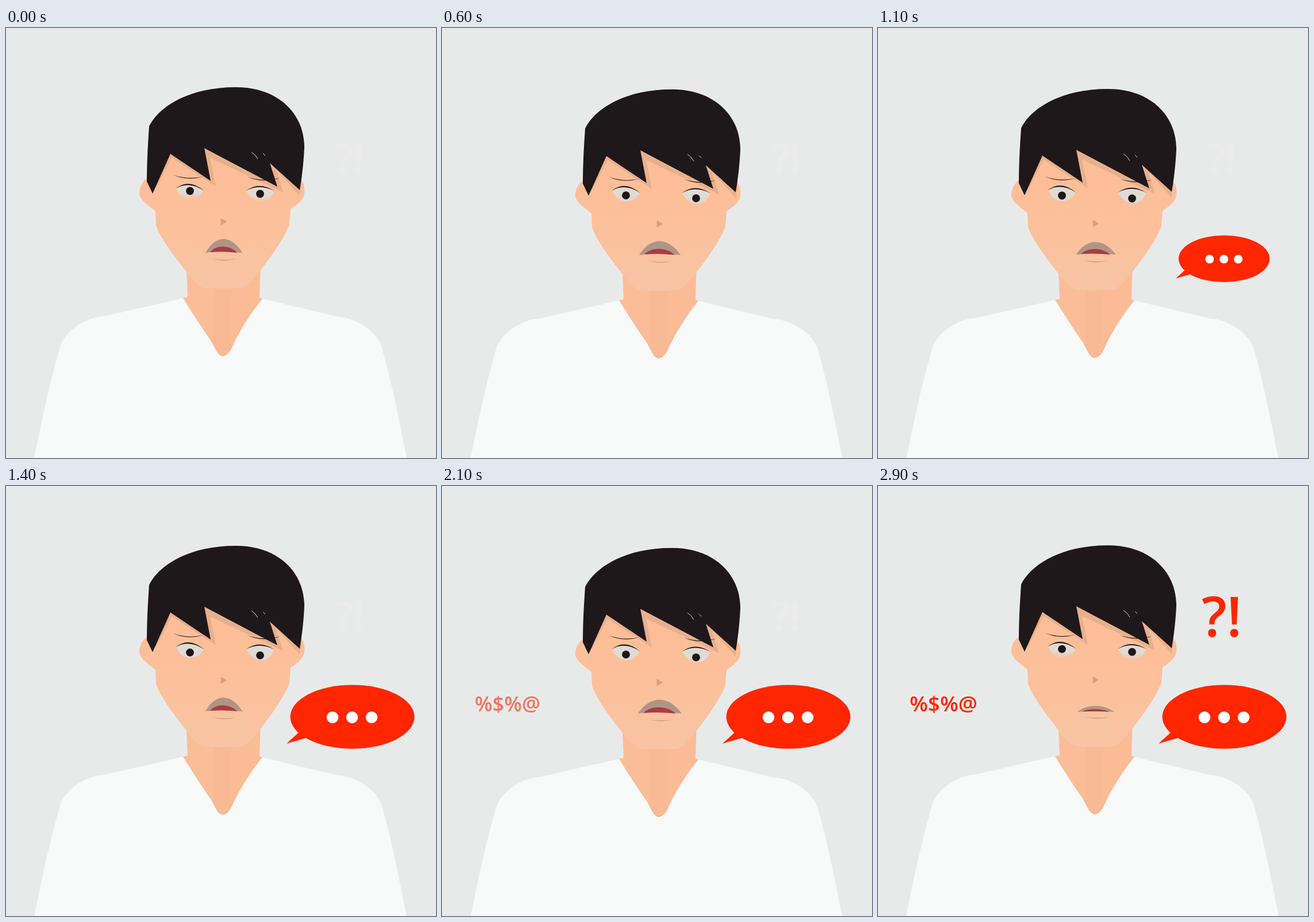
An HTML page that plays this animation: 748 px wide and 748 px high, repeating every 3 s.

```html
<!DOCTYPE html>
<html lang="en">
<head>
<meta charset="utf-8">
<title>Speechless</title>
<style>
html, body { margin: 0; width: 100%; height: 100%; overflow: hidden; background: #e8eaea; }
svg { display: block; width: 100%; height: 100%; }
text { font-family: "Open Sans", "Noto Sans", sans-serif; font-weight: 600; text-anchor: middle; }
</style>
</head>
<body>
<svg viewBox="0 0 748 748">
  <defs>
    <linearGradient id="skin" gradientUnits="userSpaceOnUse" x1="0" y1="260" x2="0" y2="453">
      <stop offset="0" stop-color="#fdbe97"/>
      <stop offset=".4" stop-color="#fcc09b"/>
      <stop offset="1" stop-color="#f8c4a4"/>
    </linearGradient>
    <linearGradient id="neck" gradientUnits="userSpaceOnUse" x1="308" y1="0" x2="446" y2="0">
      <stop offset="0" stop-color="#fbbd97"/>
      <stop offset=".38" stop-color="#fabd98"/>
      <stop offset=".38" stop-color="#f8ba94"/>
      <stop offset=".6" stop-color="#f8ba94"/>
      <stop offset=".6" stop-color="#fabb95"/>
      <stop offset="1" stop-color="#fbbc95"/>
    </linearGradient>
    <linearGradient id="white" x1="0" y1="0" x2="0" y2="1">
      <stop offset=".55" stop-color="#dfdbd5"/>
      <stop id="fade" offset="1" stop-color="#dfdbd5"/>
    </linearGradient>
  </defs>
  <rect width="748" height="748" fill="#e8eaea"/>

  <g id="man">
    <path fill="#f8f9f9" d="M46 762C60 695 74 622 95 552C104 528 132 508 162 502L168 502L308 470L446 471L580 503L586 503C618 510 645 530 653 553C673 622 685 690 700 762Z"/>
    <path fill="url(#neck)" d="M313 400L316 468L308 470C326 499 343 525 357 545C365 560 369 571 377 571C386 570 391 561 395 552C404 531 424 498 446 471L441 469L443 400Z"/>
    <path fill="url(#skin)" d="M250 258C236 266 231 280 232 290C234 299 246 308 260 319L261 343C266 360 286 389 306 414C324 438 336 453 350 453L404 453C416 453 424 444 443 421C466 392 490 355 493 341L495 315C509 306 518 298 519 288C520 277 518 269 513 264L500 170L260 170Z"/>
    <path fill="#e7b08d" d="M250 280L262 277L288 226L365 276L355 226L482 286L470 247L511 292L515 240L340 190L250 215Z"/>

    <g fill="#2a1d1c">
      <path d="M290 255Q314 264.500 343 258.500Q314 267 290 255Z"/>
      <path d="M420 259Q446 268 477 261Q446 270.500 420 259Z"/>
    </g>
    <g fill="url(#white)">
      <path d="M296 280Q318 263 344 283Q336 298 320 298Q304 297 296 280Z"/>
      <path d="M418 284Q440 267 466 284Q460 302 443 302Q427 300 418 284Z"/>
    </g>
    <g fill="#1d1719">
      <path d="M295 279.500Q318 260.500 345 283.500Q318 265 295 279.500Z"/>
      <path d="M417 283.500Q440 266 467 283.500Q440 270 417 283.500Z"/>
    </g>
    <g id="pupils" fill="#1d1719">
      <circle cx="320" cy="283.500" r="6.900"/>
      <circle cx="442" cy="288.500" r="6.900"/>
    </g>

    <path fill="#d3a285" d="M373.500 332Q374 330.500 376 332L384 337L376 342Q374 343.500 373.500 342Z"/>
    <g id="mouth">
      <path fill="#b19584" d="M-32 0C-23-16-12-24-1-24C13-24 24-13 32 0C16-2-14-3-32 0Z"/>
      <path fill="#a93c45" d="M-24-1C-14-14 11-14 23 0Q0-3-24-1Z"/>
    </g>
    <path fill="#c9987c" d="M359 401.500Q379 404.500 400 402Q379 407 359 401.500Z"/>

    <path fill="#1e181a" d="M249 171C262 143 310 103 400 103C470 103 518 145 519 207C518 232 515 258 511 282L459 235L472 276L345 209L356 266L286 219L255 288L245 267C245 235 247 200 249 171Z"/>
    <path fill="none" stroke="#d4d2d2" d="M427 216Q434 220 438 228M447 218L451 222"/>
  </g>

  <g id="bubble">
    <path fill="#ff2600" d="M488 448L510 428L530 420L530 436Z"/>
    <ellipse cx="602.500" cy="401.500" rx="108" ry="55.500" fill="#ff2600"/>
    <g fill="#fff">
      <circle cx="568" cy="402.500" r="10.200"/>
      <circle cx="602" cy="402.500" r="10.200"/>
      <circle cx="636" cy="402.500" r="10.200"/>
    </g>
  </g>
  <text id="swear" x="114" y="392" font-size="37" fill="#ff2600">%$%@</text>
  <text id="huh" x="598" y="262" font-size="96">?!</text>
</svg>
<script>
const LOOP = 3000, STEP = 100;
const el = id => document.getElementById(id);
const [man, pupils, mouth, fade, bubble, swear, huh] =
  ["man", "pupils", "mouth", "fade", "bubble", "swear", "huh"].map(el);

// keys: [time, value] pairs, linear between them
function track(keys, t) {
  if (t <= keys[0][0]) return keys[0][1];
  for (let i = 1; i < keys.length; i++) {
    const [a, u] = keys[i - 1], [b, v] = keys[i];
    if (t <= b) return u + (v - u) * (t - a) / (b - a);
  }
  return keys[keys.length - 1][1];
}

const BOB = [[0, 0], [100, .3], [400, 2.3], [700, 4.6], [800, 4.9], [900, 4.4], [1200, 2.3],
  [1400, 1.1], [1500, .3], [1600, .5], [1800, 2], [2100, 4.7], [2200, 4.8], [2400, 3.5],
  [2500, 2.8], [2800, .7], [2900, .2], [3000, 0]];
const GAZE = [[0, 0], [400, 2.8], [800, 5], [2100, 5], [2500, 2.4], [2900, 0]];
const BUBBLE = [[900, 0], [1200, 1.1], [1400, 1]];
const SWEAR = [[1900, .72], [2000, .82], [2100, .965], [2200, 1.07], [2400, 1]];
const SWEAR_ALPHA = [[1900, 0], [2100, .6], [2300, 1]];
const HUH = [[2200, .72], [2400, 1.04], [2500, 1]];
const HUH_ALPHA = [[2200, 0], [2500, .78], [2700, 1]];

// how far the lips are pressed together, 0..1
function press(t) {
  const gap = Math.abs((t - 400 + 937.5) % 625 - 312.5);
  const k = Math.max(0, 1 - gap / 100);
  return k * k * (3 - 2 * k);
}

const zoom = (node, x, y, s) =>
  node.setAttribute("transform", `translate(${x} ${y}) scale(${s}) translate(${-x} ${-y})`);

const mix = (a, b, k) => Math.round(a + (b - a) * k);

function draw(t) {
  const bob = track(BOB, t), gaze = track(GAZE, t), shut = press(t);
  man.setAttribute("transform", `translate(0 ${bob})`);
  pupils.setAttribute("transform", `translate(0 ${gaze})`);
  fade.setAttribute("stop-opacity", .15 + gaze * .16);
  const wide = 1 + .19 * (bob / 4.7) ** 2;
  mouth.setAttribute("transform",
    `translate(379 ${391 + 1.5 * shut}) scale(${wide} ${1 - .57 * shut})`);

  const size = track(BUBBLE, t);
  bubble.style.display = size ? "" : "none";
  zoom(bubble, 601, 401, size || 1);

  swear.setAttribute("opacity", track(SWEAR_ALPHA, t));
  zoom(swear, 114, 380, track(SWEAR, t));

  const k = track(HUH_ALPHA, t);
  huh.setAttribute("fill", `rgb(${mix(236, 255, k)},${mix(235, 38, k)},${mix(233, 0, k)})`);
  zoom(huh, 598.5, 227, track(HUH, t));
}

const start = performance.now();
function tick() {
  const t = (performance.now() - start) % LOOP;
  draw(Math.floor(t / STEP) * STEP);
  requestAnimationFrame(tick);
}
tick();
</script>
</body>
</html>
```
